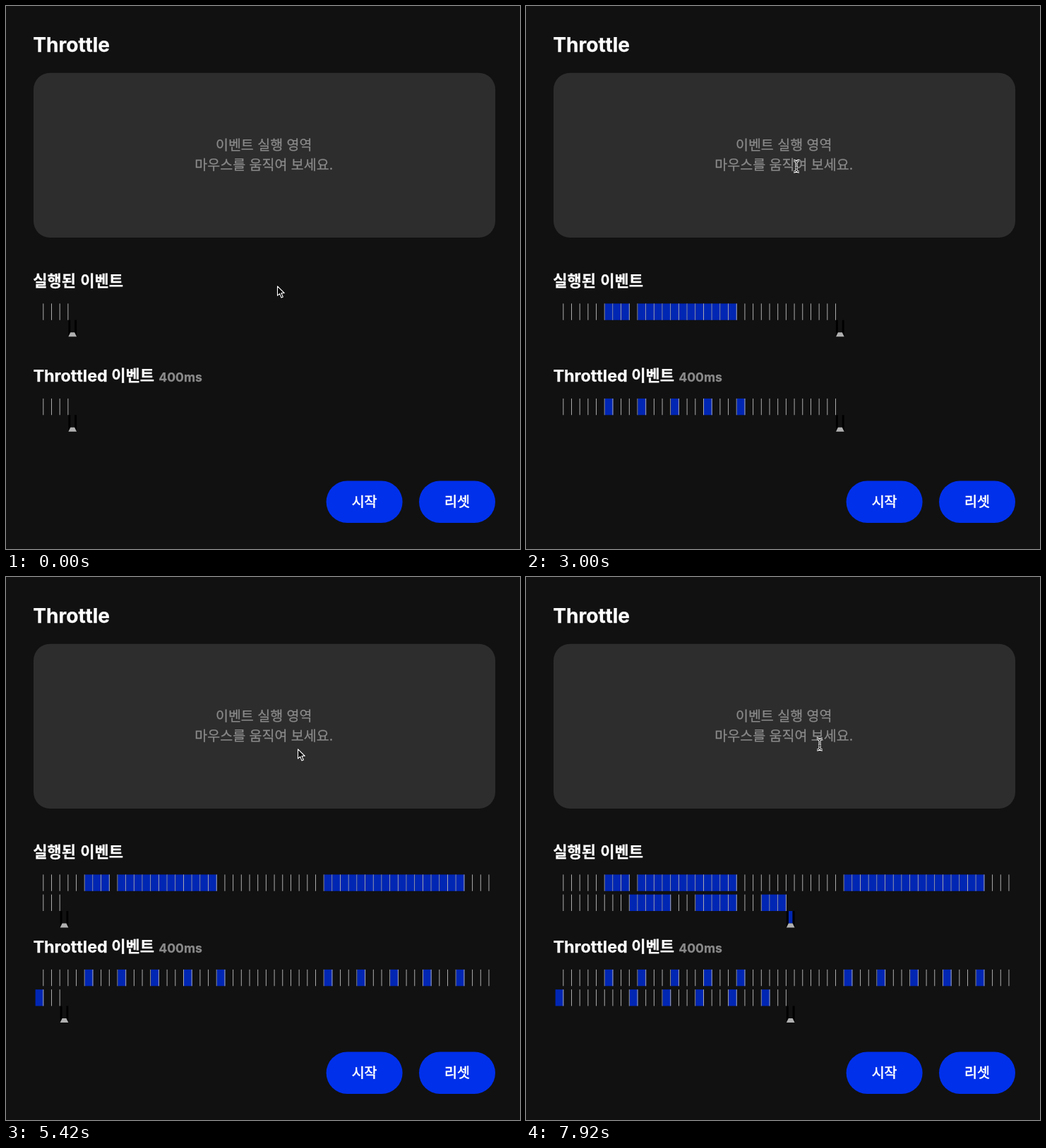
An HTML page with a canvas for the animation above (8000 ms loop, 728 by 769 pixels).

```html
<!DOCTYPE html>
<html lang="ko">
<head>
<meta charset="utf-8">
<title>Throttle</title>
<style>
  html, body { margin: 0; width: 100%; height: 100%; overflow: hidden; background: #111; }
  svg, canvas { position: absolute; left: 0; top: 0; display: block; }
  text {
    fill: #fff; stroke: #fff; stroke-width: .25px;
    font-family: "Noto Sans CJK KR", "Noto Sans CJK", "Noto Sans KR", sans-serif;
  }
  .en { font-family: Inter, sans-serif; font-weight: 700; }
  .head { font-size: 22px; font-weight: 700; }
  .mid { font-size: 19.5px; text-anchor: middle; }
  .btn { stroke-width: .6px; }
  .dim { fill: #8a8a8a; stroke: #8a8a8a; }
</style>
</head>
<body>
<svg width="728" height="769" viewBox="0 0 728 769">
  <rect x="39" y="94.7" width="654" height="233.3" rx="23.4" fill="#2d2d2d"/>
  <rect x="453.6" y="672.6" width="108" height="59.4" rx="29.7" fill="#0030ea"/>
  <rect x="585" y="672.6" width="108" height="59.4" rx="29.7" fill="#0030ea"/>
  <text class="en" x="38.2" y="65.3" font-size="28.1">Throttle</text>
  <text class="mid dim" x="365.2" y="204">이벤트 실행 영역</text>
  <text class="mid dim" x="365.2" y="232.3">마우스를 움직여 보세요.</text>
  <text class="head" x="38.3" y="396.8">실행된 이벤트</text>
  <text class="en" x="38.4" y="531.5" font-size="23.4">Throttled</text>
  <text class="head" x="149.3" y="531.2">이벤트</text>
  <text class="en dim" x="216.3" y="531.5" font-size="17.6">400ms</text>
  <text class="mid btn" x="507.6" y="708.6">시작</text>
  <text class="mid btn" x="639" y="708.6">리셋</text>
</svg>
<canvas id="stage" width="728" height="769"></canvas>
<script>
const ctx = document.getElementById('stage').getContext('2d');

const LOOP = 8000, STEP = 1000 / 12, TICK = 100, FIRST = 4, LEAD = 40;
const SCALE = 0.974, PITCH = 12 * SCALE, CELL = 24 * SCALE, ROW = 29 * SCALE;
const LEFT = 41.6, COLS = 55, WAIT = 4;
const BLUE = '#0026b4', GREY = '#b0b0b0';

// Pointer moves: first and last cell, then where it comes to rest
const home = { x: 384, y: 396 };
const moves = [
  { from: 6, to: 8, x: 372, y: 190 },
  { from: 10, to: 21, x: 383, y: 227 },
  { from: 35, to: 51, x: 413, y: 243 },
  { from: 64, to: 68, x: 372, y: 250 },
  { from: 72, to: 76, x: 385, y: 215 },
  { from: 80, to: 83, x: 416, y: 237 }
];

const fired = i => moves.some(m => i >= m.from && i <= m.to);

// Leading and trailing throttle: one call per WAIT cells while events arrive
const calls = new Set();
for (let i = 0, last = -WAIT, pending = false; i < 2 * COLS; i++) {
  pending = pending || fired(i);
  if (pending && i - last >= WAIT) {
    calls.add(i);
    last = i;
    pending = fired(i);
  }
}

const cellStart = i => (i - FIRST) * TICK - LEAD;

function pointerAt(t) {
  let rest = home;
  for (const m of moves) {
    const t0 = cellStart(m.from), t1 = cellStart(m.to);
    if (t < t0) break;
    if (t < t1) {
      const u = (t - t0) / (t1 - t0), e = u * u * (3 - 2 * u);
      const sway = Math.min(1, 6 * u, 6 * (1 - u)), s = t - 4416;
      return [
        rest.x + (m.x - rest.x) * e - 65 * sway * Math.cos(s * 0.01481),
        rest.y + (m.y - rest.y) * e - 44 * sway * Math.cos(s * 0.01296)
      ];
    }
    rest = m;
  }
  return [rest.x, rest.y];
}

function rect(x, y, w, h, color) {
  ctx.fillStyle = color;
  ctx.fillRect(x, y, w, h);
}

function poly(points, color) {
  ctx.fillStyle = color;
  ctx.beginPath();
  points.forEach(([x, y]) => ctx.lineTo(x, y));
  ctx.closePath();
  ctx.fill();
}

function track(top, count, isOn) {
  const place = i => [LEFT + i % COLS * PITCH, top + Math.floor(i / COLS) * ROW];
  for (let i = 0; i < count; i++) {
    const [x, y] = place(i);
    if (isOn(i)) rect(x, y, PITCH, CELL, BLUE);
    rect(x + PITCH - SCALE, y, SCALE, CELL, GREY);
  }
  const [x, y] = place(count);
  head(x, y + CELL, isOn(count));
}

// Current cell: thick side borders and a mitred base
function head(x, y, on) {
  const side = 3 * SCALE, r = x + PITCH, b = y + CELL, m = b - 6 * SCALE;
  if (on) rect(x + side, y, PITCH - 2 * side, m - y, BLUE);
  poly([[x, y], [x + side, y], [x + side, m], [x, b]], '#000');
  poly([[r, y], [r - side, y], [r - side, m], [r, b]], '#000');
  poly([[x + side, m], [r - side, m], [r, b], [x, b]], GREY);
}

const arrow = new Path2D('M.5 .8V14.2L3.6 11.4L6 17L8.3 16L5.9 10.5H10.2Z');
const beam = new Path2D('M-4 -8Q0 -8 0 -5Q0 -8 4 -8M0 -5V5M-4 8Q0 8 0 5Q0 8 4 8M-2 2H2');

function stroke(path, width, color) {
  ctx.lineWidth = width;
  ctx.strokeStyle = color;
  ctx.stroke(path);
}

function pointer(x, y) {
  const overText = x > 268 && x < 462 && y > 212 && y < 240;
  ctx.save();
  ctx.translate(Math.round(x), Math.round(y));
  ctx.lineJoin = 'round';
  if (overText) {
    stroke(beam, 3, '#fff');
    stroke(beam, 0.9, '#000');
  } else {
    ctx.fillStyle = '#000';
    ctx.fill(arrow);
    stroke(arrow, 1.1, '#fff');
  }
  ctx.restore();
}

function draw(now) {
  const t = Math.floor((now % LOOP + 4) / STEP) * STEP % LOOP;
  const count = FIRST + Math.floor((t + LEAD) / TICK);
  ctx.clearRect(0, 0, 728, 769);
  track(421.4, count, fired);
  track(555.9, count, i => calls.has(i));
  pointer(...pointerAt(t));
}

const start = performance.now();
function frame() {
  draw(performance.now() - start);
  requestAnimationFrame(frame);
}
frame();
</script>
</body>
</html>
```
